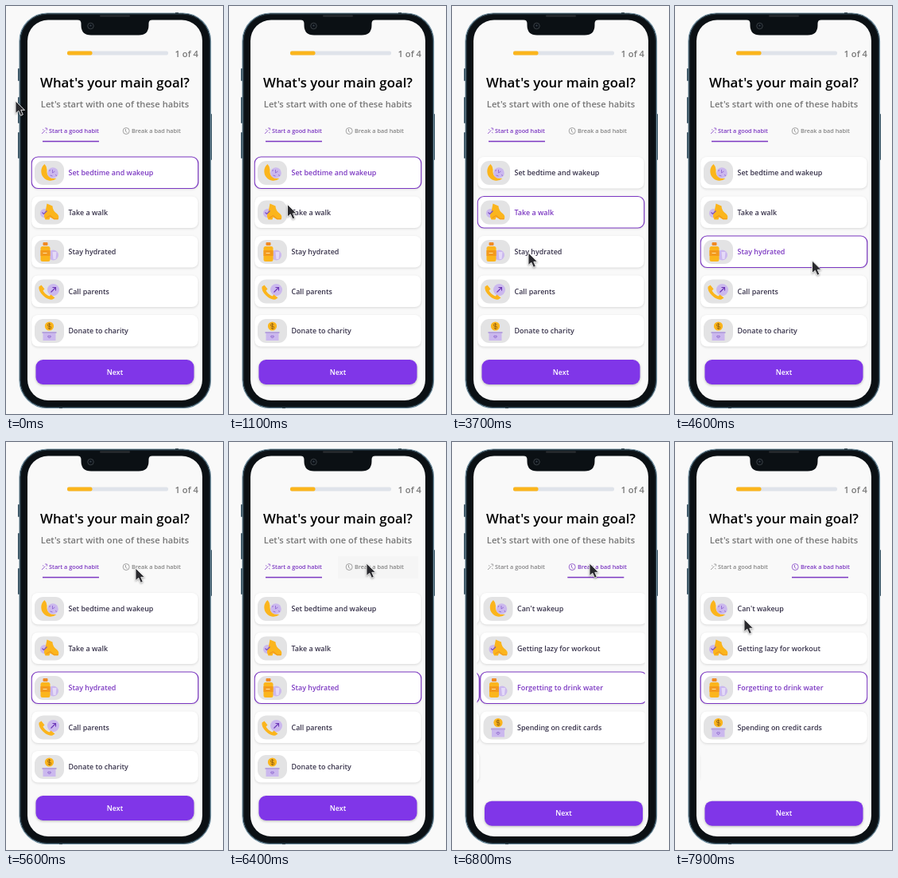
An HTML page for the animation above (8000 ms loop, 273 px wide and 511 px high).

```html
<!DOCTYPE html>
<html lang="en">
<head>
<meta charset="utf-8">
<title>Habit goal picker</title>
<style>
  :root { --purple: #7c38c2; --dark: #37324a; --grey: #858585; }
  html, body { margin: 0; width: 100%; height: 100%; overflow: hidden; background: #f9f9f9; }
  svg { display: block; width: 100%; height: 100%; }
  text { font: 600 8.96px "Open Sans", "Noto Sans", sans-serif; }
  .title { font-size: 16.8px; }
  .sub { font-size: 11.2px; fill: #777; }
  .tab { --on: 0; color: color-mix(in srgb, var(--purple) calc(var(--on) * 100%), var(--grey)); }
  .tab text { font-size: 7.3px; fill: currentColor; }
  .tab path, .tab circle { fill: none; stroke: currentColor; stroke-width: .75; }
  .row { --on: 0; }
  .card { fill: #fff; filter: drop-shadow(0 1px 1.5px #0002); }
  .ring { fill: none; stroke: var(--purple); stroke-width: 1.2; opacity: var(--on); }
  .row > text { fill: color-mix(in srgb, var(--purple) calc(var(--on) * 100%), var(--dark)); }
  .next rect { fill: #8036e8; filter: drop-shadow(0 1px 1.5px #0004); }
  .next text { fill: #fff; }
  .mid { text-anchor: middle; }
  #cursor { fill: #2a2a2e; stroke: #f4f4f4; stroke-width: .9; filter: drop-shadow(.5px 1px .8px #0005); }
</style>
</head>
<body>
<svg viewBox="0 0 273 511">
  <defs>
    <clipPath id="view"><rect x="31.4" y="176" width="211.2" height="318"/></clipPath>
    <clipPath id="tabBox"><rect x="137" y="143" width="101" height="28"/></clipPath>

    <g id="moon">
      <path d="M-6-11A11.5 11.5 0 1 0 9 7Q-4 8-3-4Q-3-8-6-11Z" fill="#fbb51c"/>
      <circle cx="4.5" r="6.8" fill="#cbb8ee"/>
      <path d="M4-4V0L7-2M1 3l3 1M8 2l1 2M0-2l1-2" fill="none" stroke="#8a60d0" stroke-width=".8"/>
    </g>
    <g id="shoe">
      <circle cx="-6" cy="1" r="5.5" fill="#cbb8ee"/>
      <path d="M-3-11L4-8Q4-2 10 2Q13 5 11 9L6 9L1 6L0 9H-5Q-8 4-5-1Z" fill="#fbb51c"/>
      <path d="M-4 7L1 4L6 8H11" fill="none" stroke="#f39a1d" stroke-width="1.2"/>
      <path d="M-9 0l2 2l4-4" fill="none" stroke="#7a4fc4" stroke-width="1.1"/>
    </g>
    <g id="bottle">
      <circle cx="5" cy="4" r="6.5" fill="#cbb8ee"/>
      <path d="M4 0h5l-1 9h-3Z" fill="#e4daf8"/>
      <rect x="-8" y="-12" width="6" height="4" rx="1" fill="#f08a24"/>
      <rect x="-11" y="-7" width="12" height="19" rx="2.5" fill="#fbb51c"/>
      <path d="M-11-2H1V5H-11Z" fill="#f39a1d"/>
      <path d="M-8 1.500h5" stroke="#ffe0a0"/>
    </g>
    <g id="phone">
      <circle cx="5" cy="-2" r="7.5" fill="#cbb8ee"/>
      <path d="M-13-6L-10-8L-6-3L-8-1Q-5 4 0 6L2 4L7 8L4 10Q-2 11-8 5Q-14-1-13-6Z" fill="#fbb51c"/>
      <path d="M2 1L8-5M4-5H8V-1" fill="none" stroke="#6b35b5" stroke-width="1.1"/>
    </g>
    <g id="coin">
      <rect x="-8" y="1" width="16" height="11" fill="#cbb8ee"/>
      <path d="M-9 1H9V3H-9Z" fill="#b6a3dd"/>
      <circle cy="-6" r="5.6" fill="#fbb51c"/>
      <path d="M2-8Q-2-10-2-7.5T0-6T2-4T-2-4M0-10v8" fill="none" stroke="#8a5a10" stroke-width=".8"/>
      <path d="M0 9L-2 7Q-1 5 0 6.500Q1 5 2 7Z" fill="none" stroke="#7a4fc4" stroke-width=".8"/>
    </g>
  </defs>

  <g fill="#2b4554">
    <rect x="15" y="78" width="2" height="16" rx="1"/>
    <rect x="15" y="114" width="2" height="33" rx="1"/>
    <rect x="15" y="158" width="2" height="33" rx="1"/>
    <rect x="257" y="135" width="2" height="58" rx="1"/>
  </g>
  <rect x="17" y="9" width="240.5" height="494.5" rx="35" fill="#0b1014" stroke="#7593a4" stroke-width="1.2"/>
  <rect x="18.3" y="10.3" width="238" height="492" rx="33.5" fill="none" stroke="#22343f"/>
  <path d="M67 503h4M213 9h4" stroke="#22343f" stroke-width="1.6"/>
  <rect x="27" y="17.5" width="220" height="476.5" rx="26" fill="#f9f9f9"/>
  <path d="M90 17Q94.500 17.500 94.500 22V24Q94.500 36.500 107 36.500H167Q179.500 36.500 179.500 24V22Q179.500 17.500 184 17Z" fill="#0b1014"/>
  <rect x="118" y="11.5" width="38" height="2" rx="1" fill="#2c2f33"/>
  <circle cx="106.500" cy="25" r="3.8" fill="#0d1218" stroke="#444b50" stroke-width=".8"/>
  <circle cx="106.500" cy="24.500" r="1" fill="#3b4650"/>

  <rect x="77" y="56.500" width="127" height="5" rx="2" fill="#dfe3ea"/>
  <rect x="77" y="56.500" width="31.500" height="5" rx="2" fill="#fbb51c"/>
  <text class="sub" x="242" y="63.500" text-anchor="end">1 of 4</text>
  <text class="title mid" x="137" y="102">What's your main goal?</text>
  <text class="sub mid" x="137" y="127">Let's start with one of these habits</text>

  <g id="ink" clip-path="url(#tabBox)">
    <rect x="137" y="143" width="101" height="28" fill="#000" opacity=".05"/>
    <circle id="splash" cx="173" cy="157" opacity=".025"/>
  </g>
  <g class="tab">
    <path d="M45 160L49.500 155.500M46 154.500l1.500 1M49 153h2.500v2.500M50 158l1.500 1"/>
    <text x="54" y="159">Start a good habit</text>
  </g>
  <g class="tab">
    <circle cx="151.200" cy="156.500" r="4"/>
    <path d="M150.500 154v3l2 1.500"/>
    <text x="158" y="159">Break a bad habit</text>
  </g>
  <rect id="underline" y="168.800" width="71" height="1.500" fill="#7c38c2"/>

  <g clip-path="url(#view)"><g id="pages"></g></g>

  <path id="cursor" d="M0 0V15.500L3.800 12.300L6.500 18.300L9.300 17L6.800 11.300H11.500Z"/>
</svg>

<script>
const LOOP = 8000, STEP = 100, PAGE_WIDTH = 211;
const $ = id => document.getElementById(id);

function pageMarkup(x, nextY, items) {
  const rows = items.map(([icon, label], i) => `
    <g class="row" transform="translate(0 ${189 + 49.5 * i})">
      <rect class="card" x="32.2" width="209.6" height="39.5" rx="8"/>
      <rect class="ring" x="32.2" width="209.6" height="39.5" rx="8"/>
      <rect x="36" y="5" width="37" height="30" rx="11" fill="#e3e3e4"/>
      <use href="#${icon}" x="54.5" y="20"/>
      <text x="78.5" y="23">${label}</text>
    </g>`).join("");
  return `<g transform="translate(${x})">${rows}
    <g class="next" transform="translate(0 ${nextY})">
      <rect x="37.5" width="199" height="31" rx="9"/>
      <text class="mid" x="137" y="18.7">Next</text>
    </g></g>`;
}

$("pages").innerHTML =
  pageMarkup(0, 443, [
    ["moon", "Set bedtime and wakeup"], ["shoe", "Take a walk"], ["bottle", "Stay hydrated"],
    ["phone", "Call parents"], ["coin", "Donate to charity"]]) +
  pageMarkup(PAGE_WIDTH, 449.7, [
    ["moon", "Can't wakeup"], ["shoe", "Getting lazy for workout"],
    ["bottle", "Forgetting to drink water"], ["coin", "Spending on credit cards"]]);

const pages = [...$("pages").children].map(page => [...page.querySelectorAll(".row")]);
const tabs = document.querySelectorAll(".tab");

// Pointer path: time, x, y
const path = [
  [100, 12, 119], [300, 12, 153], [500, 12, 153], [800, 68, 244], [1000, 68, 244],
  [1400, 90, 262], [2800, 90, 262], [3200, 96, 309], [4300, 96, 309], [4500, 126, 347],
  [4700, 219, 291], [4900, 141, 216], [5000, 120, 206], [5300, 120, 206], [5600, 163, 158],
  [6000, 173, 152], [7200, 173, 152], [7300, 203, 186], [7400, 123, 232], [7600, 123, 232],
  [7800, 104, 245], [7900, 87, 222]];

const ramp = (t, from, to) => Math.min(1, Math.max(0, (t - from) / (to - from)));

function pointerAt(t) {
  const i = path.findIndex(key => key[0] >= t);
  if (i < 0) return path.at(-1).slice(1);
  if (i === 0) return path[0].slice(1);
  const [t0, x0, y0] = path[i - 1], [t1, x1, y1] = path[i], k = ramp(t, t0, t1);
  return [x0 + (x1 - x0) * k, y0 + (y1 - y0) * k];
}

// cubic-bezier(.25, .1, .25, 1), solved by bisection
function ease(x) {
  if (x <= 0 || x >= 1) return x;
  const curve = (s, a, b) => 3 * (1 - s) ** 2 * s * a + 3 * (1 - s) * s * s * b + s ** 3;
  let lo = 0, hi = 1;
  for (let i = 0; i < 24; i++) {
    const s = (lo + hi) / 2;
    if (curve(s, .25, .25) < x) lo = s; else hi = s;
  }
  return curve(lo, .1, 1);
}

function draw(t) {
  const walk = ramp(t, 2050, 2250), water = ramp(t, 3750, 3950);
  const selected = [1 - walk, walk - water, water];
  for (const rows of pages)
    rows.forEach((row, i) => row.style.setProperty("--on", selected[i] ?? 0));

  const slide = ease(ramp(t, 6550, 6850));
  $("pages").setAttribute("transform", `translate(${-PAGE_WIDTH * slide})`);
  $("underline").setAttribute("x", 46 + 101 * slide);
  tabs[0].style.setProperty("--on", 1 - slide);
  tabs[1].style.setProperty("--on", slide);

  $("ink").setAttribute("opacity", ramp(t, 6350, 6500) * (1 - ramp(t, 6650, 6780)));
  $("splash").setAttribute("r", 70 * ramp(t, 6350, 6850));
  $("cursor").setAttribute("transform", `translate(${pointerAt(t)})`);
}

function tick(now) {
  draw(Math.floor(now % LOOP / STEP) * STEP);
  requestAnimationFrame(tick);
}
tick(performance.now());
</script>
</body>
</html>
```
